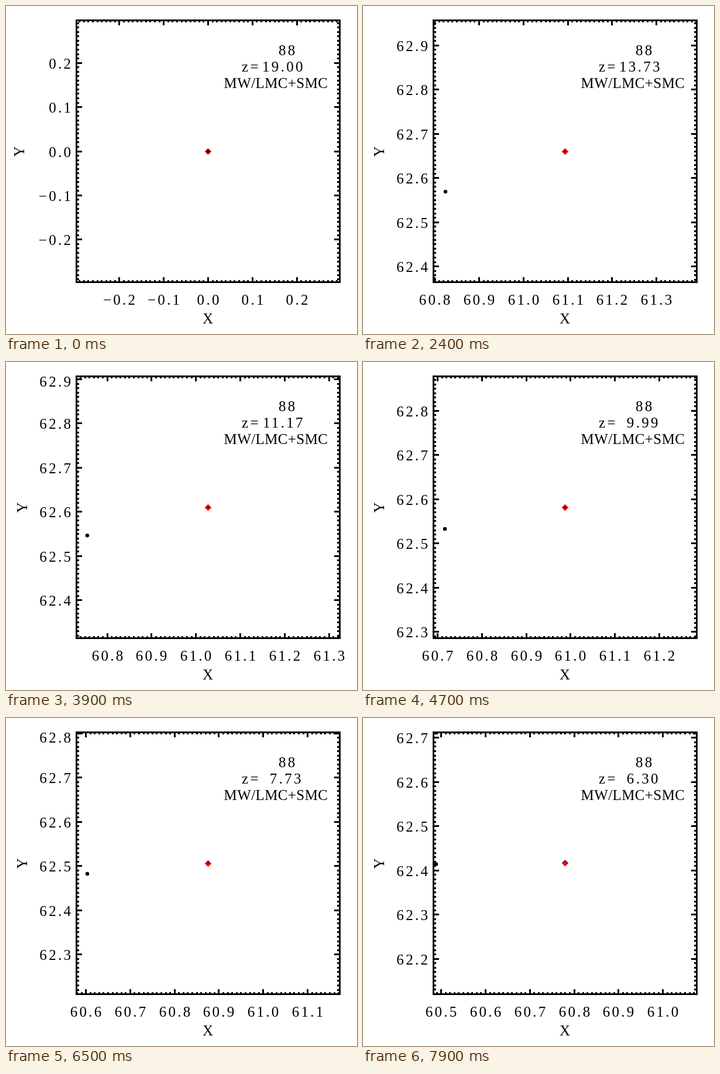
Recreate the animation shown at these times as an HTML page with a canvas. Size 600 by 560 pixels, loop 8000 ms.

```html
<!DOCTYPE html>
<html lang="en">
<head>
<meta charset="utf-8">
<title>Halo orbit</title>
<style>
  html, body { margin: 0; width: 600px; height: 560px; overflow: hidden; background: #fff; }
  canvas { display: block; }
</style>
</head>
<body>
<canvas id="plot" width="600" height="560"></canvas>
<script>
const ctx = document.getElementById('plot').getContext('2d');
const STEP = 100, COUNT = 80, FOUND = 3;
const LEFT = 120.5, RIGHT = 570.5, TOP = 24.5, BOTTOM = 471.5;
const MID_X = 345.5, MID_Y = 248, SCALE_X = 758, SCALE_Y = 754.5, HALF = 0.2965;
const GAP = 3.3;

// step, redshift, centre x, centre y, companion x, companion y (pixels)
const keys = [
  [0, 19.00, 61.183, 62.726, 143, 339],
  [13, 15.95, 61.135, 62.693, 142, 327],
  [24, 13.73, 61.094, 62.6606, 141, 317],
  [32, 12.30, 61.0624, 62.6354, 138, 306],
  [47, 9.99, 60.9875, 62.5818, 140, 285],
  [65, 7.73, 60.8756, 62.5063, 139, 266],
  [79, 6.30, 60.7795, 62.4162, 125, 249.5]
];

function stateAt(n) {
  let i = 0;
  while (i < keys.length - 2 && n >= keys[i + 1][0]) i++;
  const a = keys[i], b = keys[i + 1], u = (n - a[0]) / (b[0] - a[0]);
  const mix = k => a[k] + (b[k] - a[k]) * u;
  const z = (1 + a[1]) * ((1 + b[1]) / (1 + a[1])) ** u - 1;
  return { z, cx: mix(2), cy: mix(3), px: mix(4), py: mix(5) };
}

function text(str, x, y, align = 'left', gap = GAP) {
  ctx.letterSpacing = gap + 'px';
  ctx.textAlign = align;
  const trail = { left: 0, center: gap / 2, right: gap }[align];
  ctx.fillText(str, x + trail, y);
}

function line(x1, y1, x2, y2) {
  ctx.beginPath();
  ctx.moveTo(x1, y1);
  ctx.lineTo(x2, y2);
  ctx.stroke();
}

function disc(x, y, r, color) {
  ctx.fillStyle = color;
  ctx.beginPath();
  ctx.arc(x, y, r, 0, 7);
  ctx.fill();
}

function diamond(x, y, r, color) {
  ctx.fillStyle = color;
  ctx.beginPath();
  ctx.moveTo(x, y - r);
  ctx.lineTo(x + r, y);
  ctx.lineTo(x, y + r);
  ctx.lineTo(x - r, y);
  ctx.fill();
}

// Calls mark(value, isMajor) for every hundredth inside the range
function eachTick(centre, mark) {
  const last = Math.floor((centre + HALF) * 100);
  for (let k = Math.ceil((centre - HALF) * 100); k <= last; k++) mark(k / 100, k % 10 === 0);
}

const label = v => v.toFixed(1).replace('-', '−');
const snap = v => Math.floor(v) + 0.5;

function drawAxes(cx, cy) {
  ctx.strokeStyle = ctx.fillStyle = '#000';
  ctx.lineWidth = 3;
  ctx.strokeRect(LEFT, TOP, RIGHT - LEFT, BOTTOM - TOP);
  eachTick(cx, (v, major) => {
    const x = snap(MID_X + (v - cx) * SCALE_X);
    const len = major ? 8.5 : 3.5;
    line(x, TOP, x, TOP + len);
    line(x, BOTTOM, x, BOTTOM - len);
    if (major) text(label(v), x, 510, 'center');
  });
  eachTick(cy, (v, major) => {
    const y = snap(MID_Y - (v - cy) * SCALE_Y);
    const len = major ? 9.5 : 4.5;
    line(LEFT, y, LEFT + len, y);
    line(RIGHT, y, RIGHT - len, y);
    // End labels are kept inside the frame
    if (major) text(label(v), 111, Math.min(464, Math.max(33, y + 1)) + 8.5, 'right');
  });
}

function drawMarks(n, s) {
  if (n >= FOUND) disc(s.px, s.py, 3.2, '#000');
  const late = n > 72;
  if (late) diamond(MID_X, 247.8, 5.5, '#000');
  diamond(MID_X, 248.5, late ? 4.8 : 5.8, '#f00');
  if (n < FOUND) disc(MID_X, 248.2, 3, '#400');
  else if (n > 13 && !late) disc(MID_X, n > 56 ? 247 : 248.2, 1.7, '#400');
}

function drawText(n, z) {
  ctx.fillStyle = '#000';
  text('88', 466, 84);
  text('z=', 403, 112);
  text(z.toFixed(2), z < 10 ? 504.5 : 507.5, 112, 'right');
  text('MW/LMC+SMC', 372.5, 140, 'left', 0.4);
  text('X', 345, 542, 'center', 0);
  ctx.save();
  ctx.translate(n < FOUND ? 31 : 35.5, 248.5);
  ctx.rotate(-Math.PI / 2);
  text('Y', 0, 0, 'center', 0);
  ctx.restore();
}

function draw(now) {
  const n = Math.floor(now / STEP) % COUNT;
  const s = stateAt(n);
  if (n < FOUND) s.cx = s.cy = 0;
  ctx.fillStyle = '#fff';
  ctx.fillRect(0, 0, 600, 560);
  ctx.font = '25px "Liberation Serif", serif';
  drawAxes(s.cx, s.cy);
  drawMarks(n, s);
  drawText(n, s.z);
}

const start = performance.now();
function loop() {
  draw(performance.now() - start);
  requestAnimationFrame(loop);
}
loop();
</script>
</body>
</html>
```
